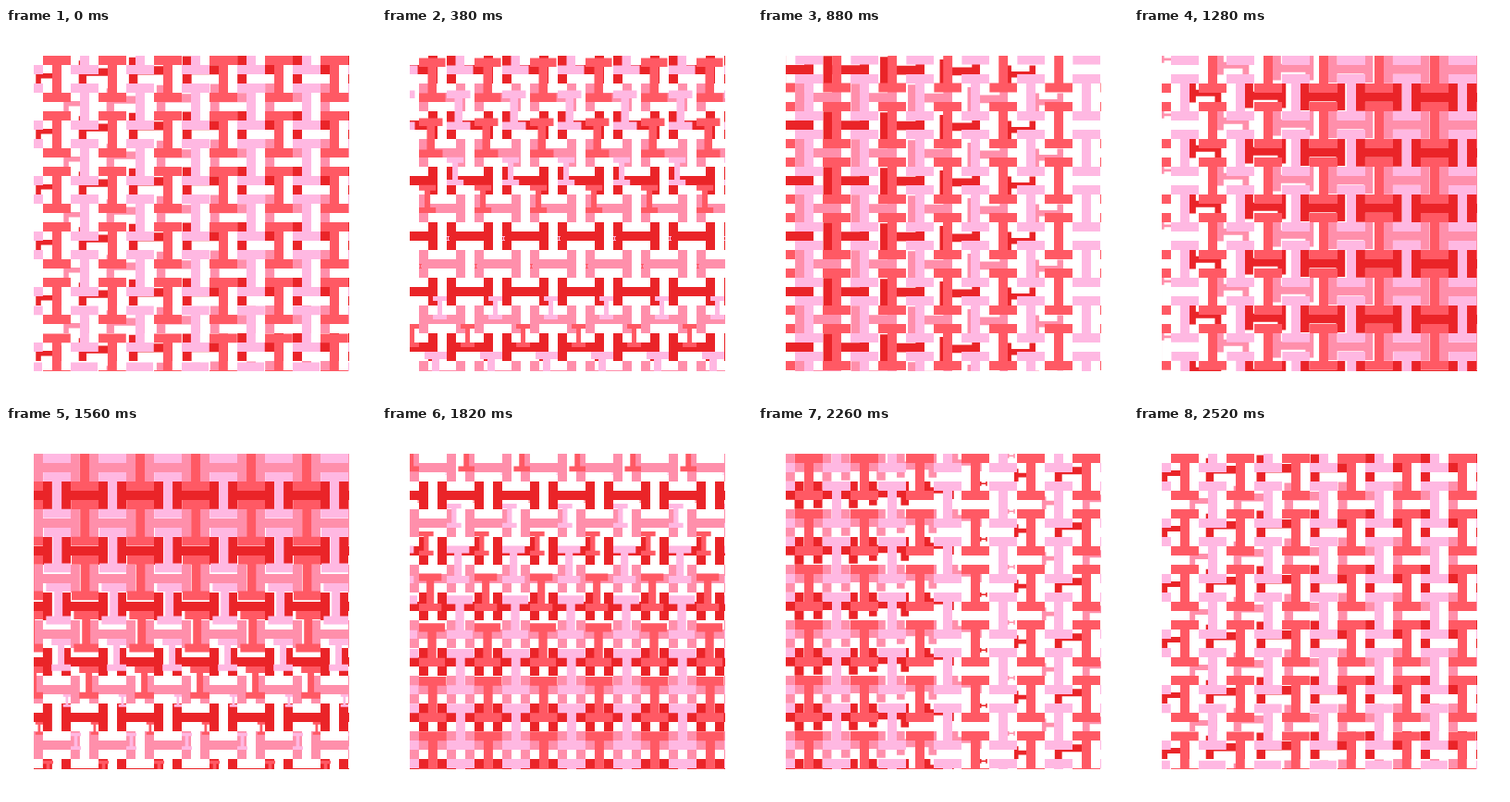
Animation, 400 px wide and 400 px high, one loop 2540 ms. Source, as an HTML page with a canvas:

```html
<!DOCTYPE html>
<html lang="en">
<head>
<meta charset="utf-8">
<title>Flipping tiles</title>
<style>
  html, body { margin: 0; width: 100%; height: 100%; overflow: hidden; background: #fff; }
  canvas { display: block; width: 400px; height: 400px; }
</style>
</head>
<body>
<canvas id="stage" width="400" height="400"></canvas>
<script>
const ctx = document.getElementById('stage').getContext('2d');

const LOOP = 2540;     // ms
const STEP = 20;       // ms per drawn pose
const SPEED = 1 / 400; // radians per ms
const CELL = 60;
const LAG = 0.15;      // phase shift per cell

// Bars of each tile as [x, y, w, h], measured from the corner it pivots on.
const WIDE = [[0, 0, 10, 30], [10, 10, 30, 10], [40, 0, 10, 30]];
const TALL = [[0, 0, 30, 10], [10, 10, 10, 30], [0, 40, 30, 10]];

// Steep ease from -1 to 1, flat at both ends.
const ease = v => Math.sign(v) * (1 - Math.pow(1 - Math.abs(v), 5));

function tile(bars, x, y, sx, sy) {
  ctx.save();
  ctx.translate(x, y);
  ctx.scale(sx, sy);
  ctx.beginPath();
  for (const bar of bars) ctx.rect(...bar);
  ctx.fill();
  ctx.restore();
}

function grid(color, x0, y0, place) {
  ctx.fillStyle = color;
  for (let i = -1; i <= 8; i++) {
    for (let j = -1; j <= 8; j++) place(x0 + i * CELL, y0 + j * CELL, i, j);
  }
}

function draw(t) {
  const phase = t * SPEED;

  // Wide tiles flip column by column, tall ones row by row.
  const wide = (x, y, i) => {
    const k = ease(Math.sin(phase + i * LAG));
    tile(WIDE, x, y, -k, -k);
  };
  const tall = (x, y, i, j) => {
    const k = ease(Math.cos(phase + j * LAG));
    tile(TALL, x, y, k, -k);
  };

  ctx.fillStyle = '#fff';
  ctx.fillRect(0, 0, 400, 400);

  ctx.save();
  ctx.beginPath();
  ctx.rect(30, 30, 341, 341);
  ctx.clip();
  grid('#ff8fab', 30, 30, wide);
  grid('#ea2428', 0, 0, wide);
  grid('#ffb8e2', 70, -10, tall);
  grid('#ff5964', 40, 20, tall);
  ctx.restore();
}

const start = performance.now();

function frame() {
  const t = (performance.now() - start) % LOOP;
  draw(Math.floor(t / STEP) * STEP);
  requestAnimationFrame(frame);
}
frame();
</script>
</body>
</html>
```
